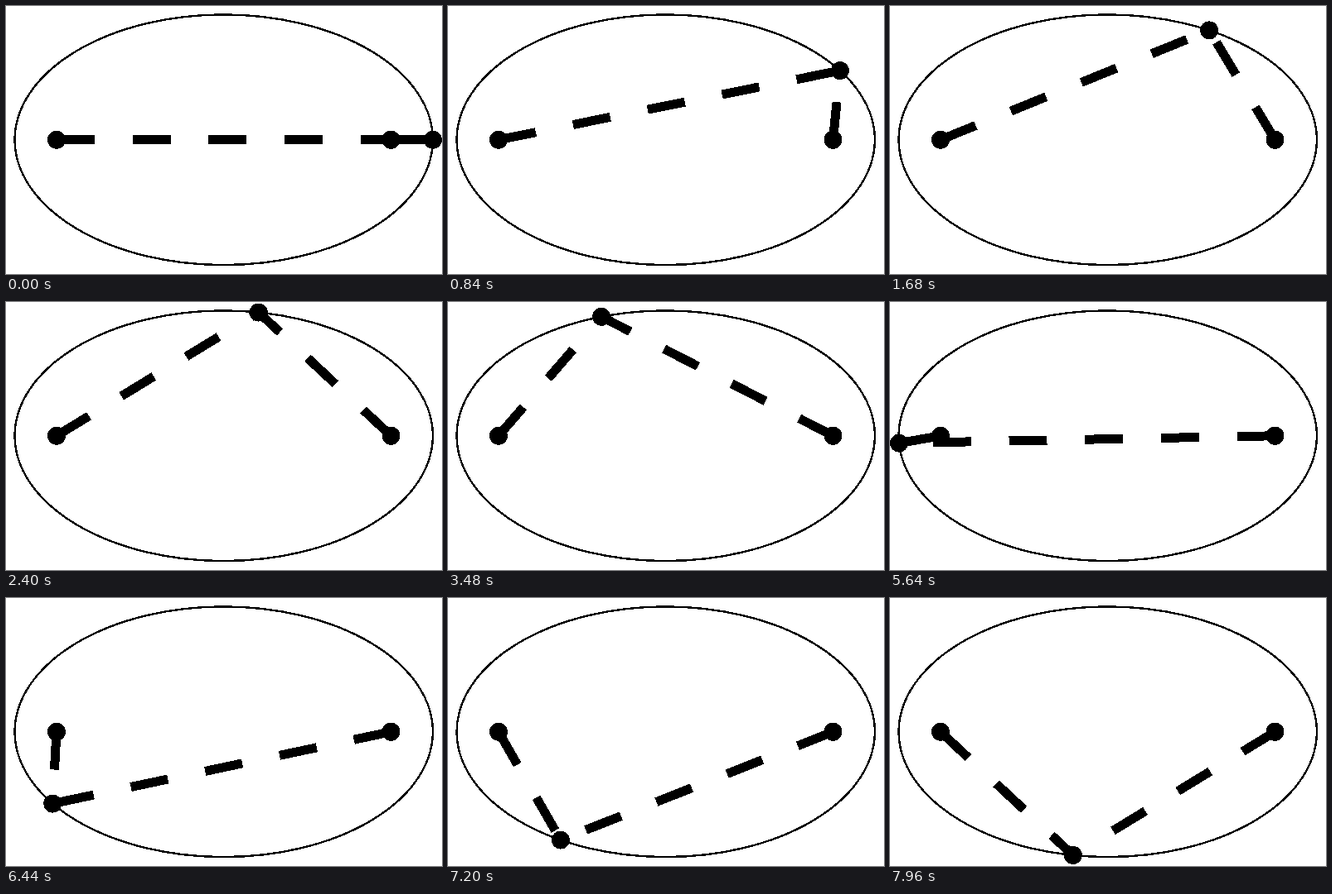
Write an HTML page that moves like this. It is 526 px wide and 324 px high and loops after 8000 ms.

```html
<!DOCTYPE html>
<html lang="en">
<head>
<meta charset="utf-8">
<title>Ellipse and its foci</title>
<style>
  html, body { margin: 0; width: 100%; height: 100%; overflow: hidden; background: #fff; }
  svg { display: block; width: 100vw; height: 100vh; }
</style>
</head>
<body>
<svg viewBox="0 0 526 324" shape-rendering="crispEdges">
  <ellipse id="rim" fill="none" stroke="#000" stroke-width="2.4"/>
  <path id="string" fill="none" stroke="#000" stroke-width="11"/>
  <circle id="left" r="11"/>
  <circle id="right" r="11"/>
  <circle id="point" r="11"/>
</svg>
<script>
const LOOP = 8000, STEP = 40, TURN = 11120;
const cx = 262.75, cy = 161.75, a = 252.2, b = a * 0.6, c = a * 0.8;

const $ = id => document.getElementById(id);
const set = (el, attrs) => {
  for (const key in attrs) el.setAttribute(key, attrs[key]);
};

const string = $('string'), point = $('point');
set($('rim'), { cx, cy, rx: a, ry: b });
set($('left'), { cx: cx - c, cy });
set($('right'), { cx: cx + c, cy });
// The string is always 2a long: eleven alternating dashes and gaps.
set(string, { 'stroke-dasharray': 2 * a / 11 });

function draw(ms) {
  const t = Math.floor((ms % LOOP) / STEP + 1e-6) * STEP;
  const u = 2 * Math.PI * t / TURN;
  // Evens out the speed along the rim.
  const angle = Math.atan2(Math.sqrt(a / b) * Math.sin(u), Math.cos(u));
  const x = cx + a * Math.cos(angle);
  const y = cy - b * Math.sin(angle);
  set(point, { cx: x, cy: y });
  set(string, { d: `M${cx - c} ${cy}L${x} ${y}L${cx + c} ${cy}` });
}

let start;
function tick(now) {
  start ??= now;
  draw(Math.max(0, now - start));
  requestAnimationFrame(tick);
}
draw(0);
requestAnimationFrame(tick);
</script>
</body>
</html>
```
